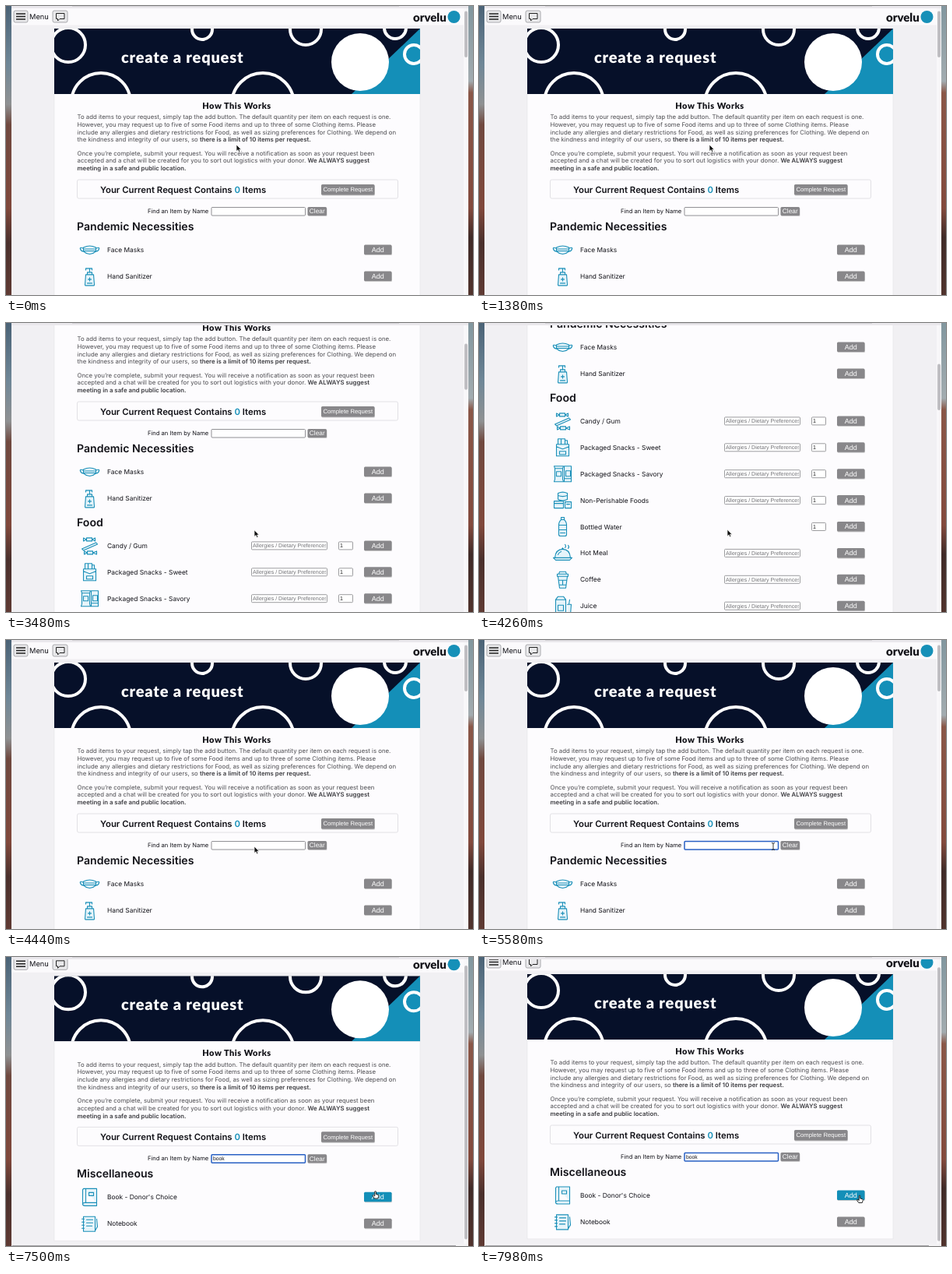
Recreate the animation shown at these times as an HTML page. Size 600 px wide and 371 px high, loop 8000 ms.

```html
<!DOCTYPE html>
<html lang="en">
<head>
<meta charset="utf-8">
<title>Create a request</title>
<style>
html, body { margin: 0; width: 100%; height: 100%; overflow: hidden; background: #f1f0f3; }
svg { display: block; }
text { font-family: Inter, sans-serif; fill: #121218; text-rendering: geometricPrecision; white-space: pre; }
.round { font-family: Lato, sans-serif; font-weight: 900; }
.ui { font-family: "Liberation Sans", Arial, sans-serif; }
.button { fill: #fff; text-anchor: middle; }
.copy text { font-size: 7.8px; fill: #4c4c50; }
.copy tspan { font-weight: 600; fill: #3c3c40; }
.icon { fill: #e6f4fa; stroke: #1b8fb8; stroke-width: 1.1; stroke-linejoin: round; stroke-linecap: round; }
.box { fill: #fff; stroke: #929296; stroke-width: .9; }
</style>
</head>
<body>
<svg id="stage" width="600" height="371" viewBox="0 0 600 371">
  <defs>
    <linearGradient id="desertLeft" x2="0" y2="1">
      <stop offset="0" stop-color="#4a6276"/>
      <stop offset=".2" stop-color="#6f8797"/>
      <stop offset=".34" stop-color="#8f9192"/>
      <stop offset=".41" stop-color="#70493f"/>
      <stop offset=".7" stop-color="#80483b"/>
      <stop offset=".82" stop-color="#4a302c"/>
      <stop offset="1" stop-color="#5f3a33"/>
    </linearGradient>
    <linearGradient id="desertRight" x2="0" y2="1">
      <stop offset="0" stop-color="#82979f"/>
      <stop offset=".26" stop-color="#a3acb0"/>
      <stop offset=".3" stop-color="#8a5748"/>
      <stop offset=".7" stop-color="#834a3d"/>
      <stop offset=".8" stop-color="#402b28"/>
      <stop offset="1" stop-color="#50332d"/>
    </linearGradient>
    <clipPath id="view"><rect x="7" y="3" width="587" height="368"/></clipPath>
    <clipPath id="banner"><rect x="62" y="29" width="470" height="84"/></clipPath>
  </defs>
  <rect width="300" height="371" fill="url(#desertLeft)"/>
  <rect x="300" width="300" height="371" fill="url(#desertRight)"/>
  <rect x="7" width="587" height="371" fill="#f1f0f3"/>
  <g clip-path="url(#view)">
    <g id="page">
      <rect x="7" width="581" height="24.5" fill="#fbfafc"/>
      <rect id="sheet" x="62" y="29" width="470" fill="#fdfcfe" stroke="#e4e3e7" stroke-width=".6"/>
      <g fill="#e9e9eb" stroke="#98989c" stroke-width=".8">
        <rect x="10" y="6" width="18" height="15" rx="2"/>
        <rect x="60" y="6" width="19" height="15" rx="2"/>
      </g>
      <path d="M13 10h12M13 13.5h12M13 17h12" stroke="#222" stroke-width="1.5"/>
      <path d="M64.500 9.500h10.500v7h-6l-2.500 2.500v-2.500h-2z" fill="none" stroke="#222" stroke-linejoin="round"/>
      <text x="30" y="17" font-size="9.3">Menu</text>
      <text class="round" x="523" y="19.500" font-size="15">orvelu</text>
      <circle cx="575.500" cy="14" r="8" fill="#1690b8"/>

      <g clip-path="url(#banner)">
        <rect x="62" y="29" width="470" height="84" fill="#061029"/>
        <path d="M532 29V113H444z" fill="#148fb8"/>
        <g id="rings" fill="none" stroke="#fff" stroke-width="4"></g>
        <circle cx="455" cy="72" r="37" fill="#fff"/>
        <text class="round" x="148" y="72.500" font-size="20" letter-spacing=".8" style="fill:#fff">create a request</text>
      </g>

      <text class="round" x="296.500" y="131.500" font-size="11" letter-spacing=".5" text-anchor="middle">How This Works</text>
      <g class="copy" id="copy"></g>

      <rect x="91.500" y="223" width="412" height="24" rx="2" fill="#fdfcfe" stroke="#e2e1e5"/>
      <text x="121" y="239.500" font-size="11.35" font-weight="600">Your Current Request Contains <tspan fill="#148fb8">0</tspan> Items</text>
      <g id="controls"></g>
      <text x="182" y="266" font-size="7.6">Find an Item by Name</text>
      <rect id="field" x="264" y="258.500" width="120.500" height="10.500" rx="1" fill="#fff"/>
      <text id="typed" class="ui" x="266" y="266" font-size="6.8"></text>
      <g id="list"></g>
    </g>
    <rect x="588" y="3" width="6" height="368" fill="#f8f7f9"/>
    <rect id="thumb" x="589" width="4" rx="2" fill="#bfbec2"/>
    <g id="bottomBar">
      <rect x="7" y="368" width="587" height="3" fill="#f4f3f5"/>
      <path d="M8 370.500H578" stroke="#a5a4a8"/>
    </g>
  </g>
  <rect x="7" width="587" height="3" fill="#eae8ec"/>
  <path d="M85 .5H505" stroke="#d2d0d5"/>
  <g id="cursor" stroke-linejoin="round">
    <path id="arrow" d="M0 0V8.500L2 6.700 3.400 9.600 4.900 8.900 3.600 6.200H6.200z" fill="#111" stroke="#fff" stroke-width=".7"/>
    <path id="beam" d="M-2-4.500Q0-4.500 0-3.300Q0-4.500 2-4.500M0-3.500V3.500M-2 4.500Q0 4.500 0 3.300Q0 4.500 2 4.500" fill="none" stroke="#222" stroke-width=".9"/>
    <path id="hand" d="M-.8-3.500Q0-4.500.8-3.500V0L3.500.7Q4.500 1 4.200 2.500L3.300 5.500H-1.200L-3.500 2Q-3.300.7-2 1.500L-.8 2.500z" fill="#fff" stroke="#111" stroke-width=".9"/>
  </g>
</svg>
<script>
const LOOP = 8000, STEP = 60, VIEW = 364, FULL_BOTTOM = 2222;
const $ = id => document.getElementById(id);

// Icons sit on a 26 px square around the origin.
const icons = {
  mask: 'M-8-3Q0-7 8-3V2Q0 9-8 2zM-8-2Q-13-4-12-1T-8 2M8-2Q13-4 12-1T8 2M-7-1H7M-7 1.500H7',
  pump: 'M-5-2H5L6 11Q6 12 5 12H-5Q-6 12-6 11zM-3-2V-5H3V-2M0-5V-9M-5-8V-10H3V-8M-2 4H2M0 2V6M-3 9H3',
  candy: 'M-4-10H3V-6H-4zM-4-8L-8-10V-6zM3-8L7-10V-6zM-10 4L8-4L10-2L-8 6zM-3 7H4V11H-3zM-3 9L-7 7V11zM4 9L9 7V11z',
  snack: 'M-8-4H8V11H-8zM-6-4V-11H-2V-4M-2-4V-11H3V-4M3-4V-9H6V-4M-8-1L0 2L8-1M-4 5H4V9H-4z',
  bags: 'M-11-10H1L0-7V7L1 10H-11L-10 7V-7zM2-10H11V10H2zM-8-3H-2V3H-8zM4-4H10V3H4zM-10-7H0M2 6H11',
  cans: 'M-6-9Q0-12 6-9V-1Q0 2-6-1zM-11 1H1V10H-11zM3 2H11V10H3zM-6-6Q0-4 6-6M-11 4H1M5 5H9',
  bottle: 'M-2-12H2V-9Q5-6 5-3V10Q5 12 3 12H-3Q-5 12-5 10V-3Q-5-6-2-9zM-2-9H2M-5-2H5M-5 4H5M-3 8H3',
  meal: 'M-10 6Q-9-5 0-5T10 6zM-12 6H12L9 9H-9zM-1-5Q0-8 1-5M-6 2Q-5-1-2-2M3-7Q5-9 3-11M7-6Q9-8 7-10',
  cup: 'M-7-7H7V-4H-7zM-5-7L-4-10H4L5-7M-6-4L-4 11H4L6-4M-5 1H5M-4 7H4M0 1V7',
  carton: 'M-9-8L-6-12H1L4-8V11H-9zM-9-8H4M6-2H11L10 11H6M-6-1H1V6H-6zM8-2L9-8',
  shoes: 'M-7-10Q-1-10-2-3L-4 2L-9 1Q-11-8-7-10zM-9 3L-4 4Q-4 8-7 8T-9 3zM5-6Q10-7 10 1L8 6L3 5Q0-4 5-6zM3 7L8 8Q7 11 5 11T3 7z',
  book: 'M-8-11H9V7H-6Q-9 7-9 9T-6 11H9V7M-9 9V-9Q-9-11-7-11M-5-11V7M-1-6H5V-2H-1z',
  pad: 'M-8-9H7V10H-8zM-10-6H-7M-10-2H-7M-10 2H-7M-10 6H-7M-4-5H4M-4-1H4M-4 3H3M9-6L10 4L7 9'
};

// Row: name, icon, flags (a = allergies, s = sizing, q = quantity).
const parse = rows => rows.split(';').map(row => row.split(','));
const sections = [
  ['Pandemic Necessities', parse('Face Masks,mask,;Hand Sanitizer,pump,')],
  ['Food', parse('Candy / Gum,candy,aq;Packaged Snacks - Sweet,snack,aq;Packaged Snacks - Savory,bags,aq;' +
    'Non-Perishable Foods,cans,aq;Bottled Water,bottle,q;Hot Meal,meal,a;Coffee,cup,a;Juice,carton,a')],
  ['Clothing', parse('Shoes / Boots,shoes,sq')],
  ['Miscellaneous', parse("Book - Donor's Choice,book,;Notebook,pad,")]
];

const button = (x, y, w, h, label, size, cls = '') =>
  `<rect x="${x + .5}" y="${y + 1}" width="${w}" height="${h}" rx="1.500" fill="#0003"/>
   <rect class="${cls}" x="${x}" y="${y}" width="${w}" height="${h}" rx="1.500" fill="#88878a"/>
   <text class="ui button" x="${x + w / 2}" y="${y + h / 2 + size * .35}" font-size="${size}">${label}</text>`;

const input = (x, y, w, label, color) =>
  `<rect class="box" x="${x + .5}" y="${y - 5}" width="${w - 1}" height="10" rx="1"/>
   <svg x="${x}" y="${y - 5}" width="${w - 2}" height="10">
     <text class="ui" x="2" y="7.500" font-size="7.1" style="fill:${color}">${label}</text>
   </svg>`;

function row([name, icon, flags], y) {
  const note = flags.includes('a') ? 'Allergies / Dietary Preferences'
    : flags.includes('s') ? 'Sizing Requirements' : '';
  const solid = icon === 'shoes' ? ' style="fill:#1690b8"' : '';
  return `<path class="icon" transform="translate(107.500 ${y})" d="${icons[icon]}"${solid}/>
    <text x="130" y="${y + 3}" font-size="8.4">${name}</text>` +
    (note ? input(315, y, 98, note, '#727276') : '') +
    (flags.includes('q') ? input(427, y, 19, '1', '#222') : '') +
    button(460, y - 6.500, 35.500, 12.500, 'Add', 9, 'add');
}

function layout(query) {
  let y = 252, html = '';
  for (const [title, items] of sections) {
    const found = items.filter(([name]) => name.toLowerCase().includes(query));
    if (!found.length) continue;
    y += 31;
    html += `<text x="91" y="${y + 5}" font-size="14.1" font-weight="600">${title}</text>`;
    found.forEach((item, i) => {
      y += i ? 33.9 : 30;
      html += row(item, y);
    });
  }
  return { html, bottom: query ? y + 22 : FULL_BOTTOM };
}

$('rings').innerHTML = [[80, 50, 22], [252, 30, 13], [122, 124, 38], [330, 126, 40], [385, 30, 20], [500, 28, 14], [524, 62, 12]]
  .map(([x, y, r]) => `<circle cx="${x}" cy="${y}" r="${r}"/>`).join('');

$('copy').innerHTML = [
  'To add items to your request, simply tap the add button. The default quantity per item on each request is one.',
  'However, you may request up to five of some Food items and up to three of some Clothing items. Please',
  'include any allergies and dietary restrictions for Food, as well as sizing preferences for Clothing. We depend on',
  'the kindness and integrity of our users, so <tspan>there is a limit of 10 items per request.</tspan>',
  'Once you’re complete, submit your request. You will receive a notification as soon as your request been',
  'accepted and a chat will be created for you to sort out logistics with your donor. <tspan>We ALWAYS suggest</tspan>',
  '<tspan>meeting in a safe and public location.</tspan>'
].map((line, i) => `<text x="91.500" y="${145.2 + i * 9.75 + (i > 3 ? 7.5 : 0)}">${line}</text>`).join('');

$('controls').innerHTML = button(405, 229, 68.500, 13.500, 'Complete Request', 7.7) + button(387.500, 258, 24.500, 11, 'Clear', 8.3);

// Tracks are rows of time followed by values.
const scrollTrack = [[3300, 0], [3480, 122], [3660, 220], [3900, 282], [4260, 282], [4440, 0], [7380, 0], [7560, 7]];
const cursorTrack = [[1700, 296, 178], [2100, 309, 232], [2460, 318, 267], [3300, 319, 266], [4500, 319, 265],
  [4760, 350, 264], [5000, 378, 265], [6720, 378, 265], [7100, 425, 288], [7560, 482, 307], [7760, 489, 310]];
const typing = [[0, ''], [5940, 'b'], [6180, 'bo'], [6360, 'boo'], [6600, 'book']];

function at(track, t) {
  const next = track.findIndex(key => key[0] > t);
  if (next === 0) return track[0].slice(1);
  if (next < 0) return track.at(-1).slice(1);
  const a = track[next - 1], b = track[next];
  const k = (t - a[0]) / (b[0] - a[0]);
  return a.slice(1).map((v, i) => v + (b[i + 1] - v) * k);
}

let shown = null, bottom = 0;

function showList(query) {
  if (query === shown) return;
  shown = query;
  const page = layout(query);
  bottom = page.bottom;
  $('list').innerHTML = page.html;
  $('typed').textContent = query;
  $('sheet').setAttribute('height', bottom - 29);
}

function render(t) {
  showList(typing.findLast(key => key[0] <= t)[1]);
  const [scroll] = at(scrollTrack, t), [x, y] = at(cursorTrack, t);
  $('page').setAttribute('transform', `translate(0 ${-scroll})`);

  const ratio = VIEW / (bottom + 8);
  $('thumb').setAttribute('y', 6.500 + scroll * ratio);
  $('thumb').setAttribute('height', Math.min(VIEW, VIEW * ratio));
  $('bottomBar').style.display = shown ? '' : 'none';

  const focused = t >= 5160;
  $('field').setAttribute('stroke', focused ? '#2860c4' : '#85858a');
  $('field').setAttribute('stroke-width', focused ? 1.5 : .9);

  const inside = (left, top, right, low) => x > left && x < right && y + scroll > top && y + scroll < low;
  const overAdd = shown === 'book' && inside(460, 306, 496, 320);
  const overField = inside(264, 257, 385, 270) && (t < 3300 || t > 4500);
  const kind = overAdd ? 'hand' : overField ? 'beam' : 'arrow';
  for (const id of ['arrow', 'beam', 'hand']) $(id).style.display = id === kind ? '' : 'none';
  $('cursor').setAttribute('transform', `translate(${x} ${y})`);
  document.querySelector('.add').setAttribute('fill', overAdd ? '#148fb8' : '#88878a');
}

const start = performance.now();
function tick() {
  const t = (performance.now() - start) % LOOP;
  render(Math.floor(t / STEP) * STEP);
  requestAnimationFrame(tick);
}
tick();
</script>
</body>
</html>
```
